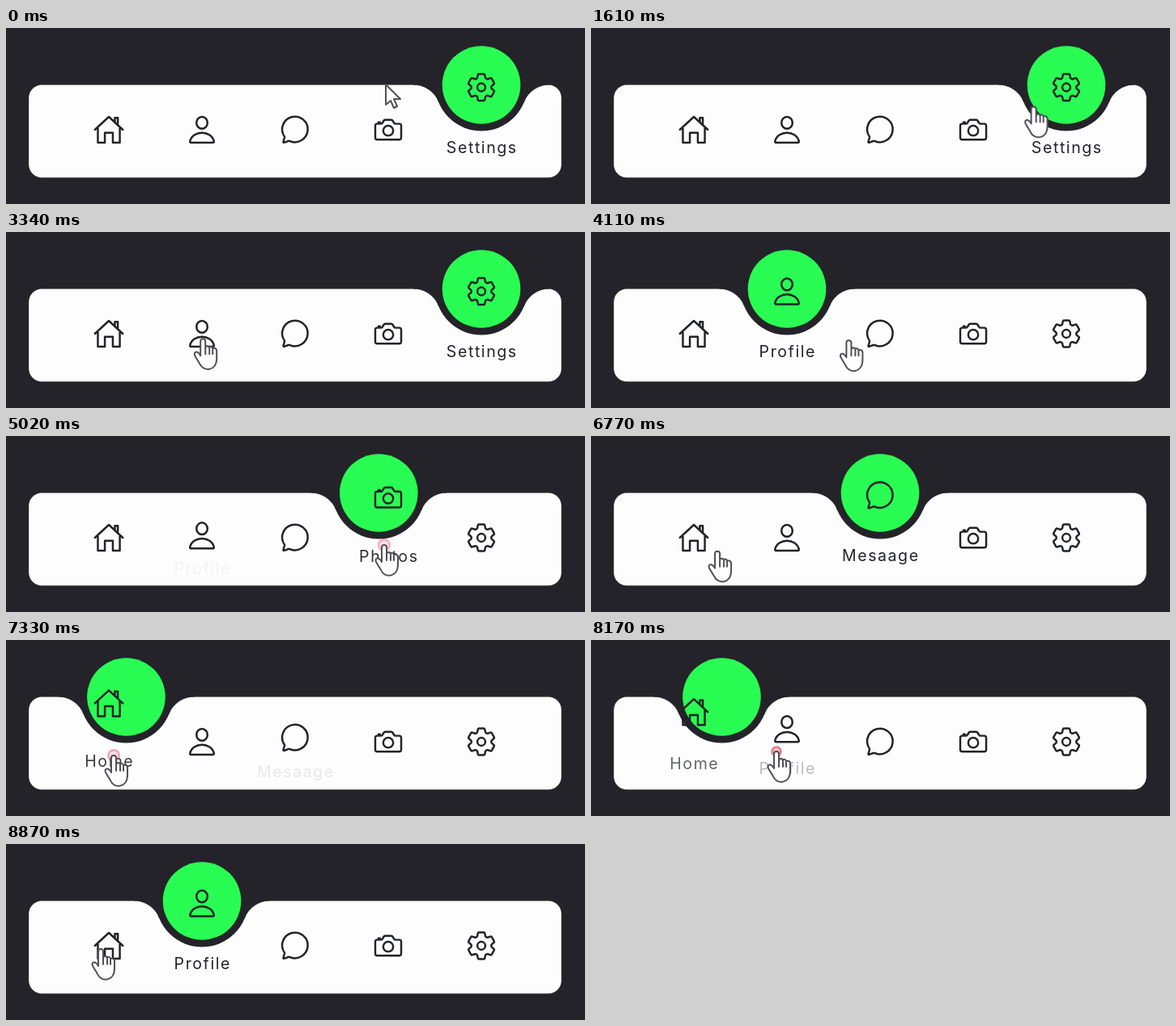
An HTML page with a canvas that plays this animation: 715x218 px, repeating every 8.94 s.

```html
<!DOCTYPE html>
<html lang="en">
<head>
<meta charset="utf-8">
<title>Navigation menu</title>
<style>
  html, body { margin: 0; height: 100%; overflow: hidden; background: #242329; }
  canvas { display: block; }
</style>
</head>
<body>
<canvas id="stage" width="715" height="218"></canvas>
<script>
const ctx = document.getElementById('stage').getContext('2d');
const BACK = '#242329', INK = '#222327', GREEN = '#29fd53', WHITE = '#fdfdfd';
const LOOP = 8940, HOLD = 1040, STEP = 7900 / 113, EASE_MS = 500;
const RIM = 70.5, NOTCH = 57, FILLET = 33;

// Icons live on a 512 unit grid
const home = new Path2D('M80 212v252h112V304h128v160h112V212M32 256L256 48 480 256M400 179V64h-48v69');

const person = new Path2D('M256 304C169 304 81 352 64 443q-2 21 16 21h352q18 0 16-21C431 352 343 304 256 304z');
person.moveTo(344, 144);
person.ellipse(256, 144, 88, 96, 0, 0, 7);

const chat = new Path2D('M84 365A205 205 0 1 1 172 438Q160 434 149 438L81 462Q65 465 68 450L87 380Q88 373 84 365z');

const camera = new Path2D('M80 160h60q13 0 21-11l27-42q8-11 22-11h92q14 0 22 11l27 42q8 11 21 11h60a32 32 0 0132 32v192a32 32 0 01-32 32H80a32 32 0 01-32-32V192a32 32 0 0132-32zM124 158v-22h-24v22');
camera.moveTo(336, 272);
camera.arc(256, 272, 80, 0, 7);

const gear = new Path2D();
const gearPoint = (radius, angle) => [256 + radius * Math.sin(angle), 256 - radius * Math.cos(angle)];
gear.moveTo(256, 42);
for (let tooth = 0; tooth < 6; tooth++) {
  const mid = tooth * Math.PI / 3;
  const corners = [[220, .24], [161, .42], [161, Math.PI / 3 - .42], [220, Math.PI / 3 - .24], [214, Math.PI / 3]]
    .map(([radius, angle]) => gearPoint(radius, mid + angle));
  for (let i = 0; i < 4; i++) gear.arcTo(...corners[i], ...corners[i + 1], 17);
}
gear.closePath();
gear.moveTo(320, 256);
gear.arc(256, 256, 64, 0, 7);

const items = Object.entries({ Home: home, Profile: person, Mesaage: chat, Photos: camera, Settings: gear })
  .map(([label, icon], i) => ({ label, icon, x: 127 + 115 * i }));

const clicks = [
  { time: 3450, item: 1, x: 243, y: 134 },
  { time: 4665, item: 3, x: 467, y: 135 },
  { time: 5820, item: 2, x: 357, y: 140 },
  { time: 7015, item: 0, x: 133, y: 143 },
  { time: 8070, item: 1, x: 229, y: 138 }
];

// The pointer arrives shortly before each click and rests a little after it
const stops = [
  { time: HOLD - 40, x: 469, y: 70 },
  { time: 1650, x: 548, y: 98 },
  { time: 3340, x: 244, y: 125 },
  ...clicks.flatMap(({ time, x, y }) => [{ time: time - 100, x, y }, { time: time + 380, x, y }]),
  { time: 8870, x: 117, y: 130 }
];

const arrow = new Path2D('M0 0V25L6 20 10 29 14 27 10 18H18z');
const hand = new Path2D('M-3 21V3C-3-1 3-1 3 3V12C3 8 8 8 8 12C8 9 12 9 12 13C12 11 17 11 17 15V24C17 41 0 41-4 31L-10 21C-12 16-7 14-3 21zM3 12v7M8 13v6M12 14v5');

const mix = (a, b, p) => a + (b - a) * p;

// CSS "ease": cubic-bezier(.25, .1, .25, 1)
function ease(x) {
  if (x <= 0 || x >= 1) return x <= 0 ? 0 : 1;
  const bezier = (s, a, b) => 3 * s * (1 - s) ** 2 * a + 3 * s * s * (1 - s) * b + s ** 3;
  let lo = 0, hi = 1;
  for (let i = 0; i < 25; i++) {
    const mid = (lo + hi) / 2;
    if (bezier(mid, .25, .25) < x) lo = mid; else hi = mid;
  }
  return bezier(lo, .1, 1);
}

function pointerAt(t) {
  const next = stops.findIndex(stop => stop.time > t);
  if (next <= 0) return next ? stops.at(-1) : stops[0];
  const a = stops[next - 1], b = stops[next];
  const u = (t - a.time) / (b.time - a.time), p = u * u * (3 - 2 * u);
  return { x: mix(a.x, b.x, p), y: mix(a.y, b.y, p) };
}

function disc(x, y, r, color) {
  ctx.fillStyle = color;
  ctx.beginPath();
  ctx.arc(x, y, r, 0, 7);
  ctx.fill();
}

function drawIndicator(x) {
  // Fillets touch both the card's rim and the round notch
  const reach = Math.sqrt((NOTCH + FILLET) ** 2 - FILLET ** 2);
  const touch = Math.atan2(-FILLET, -reach);
  ctx.fillStyle = BACK;
  for (const side of [-1, 1]) {
    ctx.save();
    ctx.translate(x, RIM);
    ctx.scale(side, 1);
    ctx.beginPath();
    ctx.moveTo(0, -1);
    ctx.lineTo(reach, -1);
    ctx.arc(reach, FILLET, FILLET, -Math.PI / 2, touch, true);
    ctx.lineTo(0, FILLET / 2);
    ctx.fill();
    ctx.restore();
  }
  disc(x, RIM, NOTCH, BACK);
  disc(x, RIM, 48.3, GREEN);
}

function drawItem({ label, icon, x }, active) {
  ctx.save();
  ctx.translate(x, mix(126, 73.5, active));
  ctx.scale(.077, .077);
  ctx.translate(-256, -256);
  ctx.lineWidth = 32;
  ctx.lineCap = ctx.lineJoin = 'round';
  ctx.strokeStyle = INK;
  ctx.stroke(icon);
  ctx.restore();

  ctx.globalAlpha = active;
  ctx.fillStyle = INK;
  ctx.fillText(label, x + .8, mix(171.4, 155, active));
  ctx.globalAlpha = 1;
}

function drawPointer(t, age) {
  const { x, y } = pointerAt(t);
  if (age < EASE_MS) {
    const alpha = .75 - age / 900;
    disc(x, y, 5 + age / 180, `rgba(225, 60, 85, ${alpha * .4})`);
    ctx.strokeStyle = `rgba(225, 60, 85, ${alpha})`;
    ctx.lineWidth = 2.5;
    ctx.stroke();
  }
  const shape = y > 72 ? hand : arrow;
  ctx.save();
  ctx.translate(x, y);
  ctx.lineJoin = ctx.lineCap = 'round';
  ctx.lineWidth = 2;
  ctx.fillStyle = '#fff';
  ctx.strokeStyle = '#505056';
  ctx.fill(shape);
  ctx.stroke(shape);
  ctx.restore();
}

function draw(t) {
  const done = clicks.filter(click => click.time <= t);
  const [from, to] = [4, 4, ...done.map(click => click.item)].slice(-2);
  const age = done.length ? t - done.at(-1).time : Infinity;
  const p = ease(age / EASE_MS);

  ctx.fillStyle = BACK;
  ctx.fillRect(0, 0, 715, 218);
  ctx.fillStyle = WHITE;
  ctx.beginPath();
  ctx.roundRect(28.2, RIM, 657.6, 114.7, 16);
  ctx.fill();

  drawIndicator(mix(items[from].x, items[to].x, p));
  ctx.font = '19.5px Inter, sans-serif';
  ctx.letterSpacing = '1.6px';
  ctx.textAlign = 'center';
  items.forEach((item, i) => drawItem(item, i === to ? p : i === from ? 1 - p : 0));
  drawPointer(t, age);
}

function tick() {
  const t = performance.now() % LOOP;
  draw(t < HOLD ? 0 : HOLD + Math.floor((t - HOLD) / STEP + .2) * STEP);
  requestAnimationFrame(tick);
}
tick();
</script>
</body>
</html>
```
